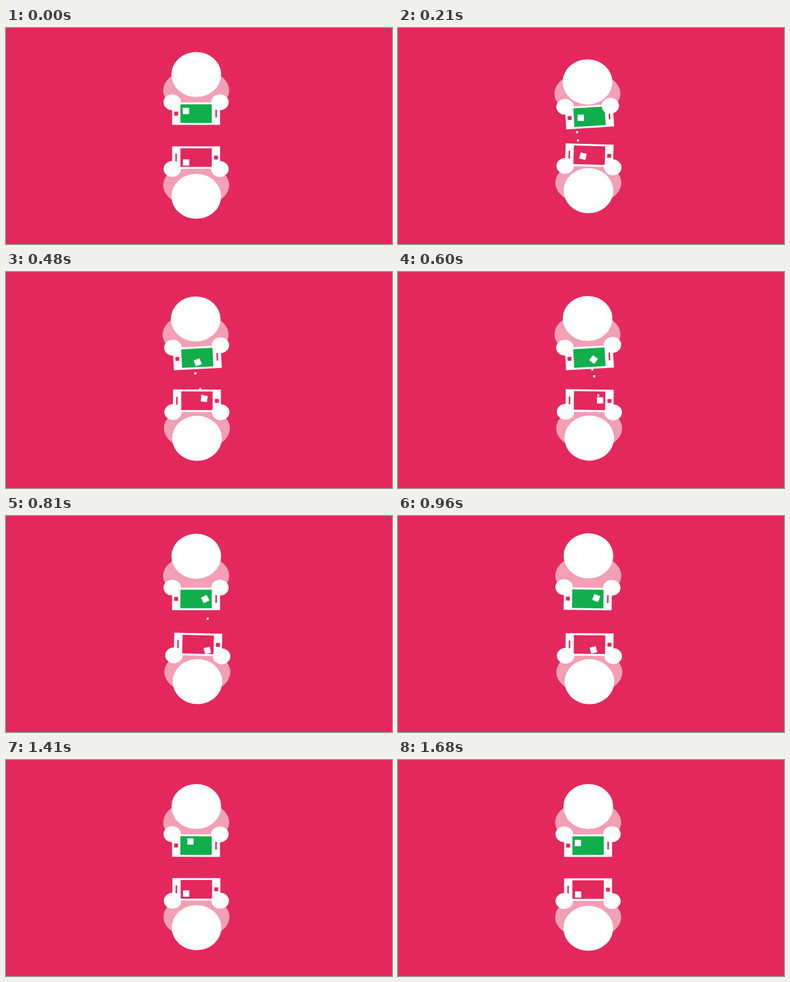
Animation, 640 px wide and 360 px high, one loop 1710 ms. Source, as an HTML page with a canvas:

```html
<!DOCTYPE html>
<html lang="en">
<head>
<meta charset="utf-8">
<title>Two players</title>
<style>
html, body { margin: 0; width: 100%; height: 100%; overflow: hidden; background: #e4285d; }
canvas { display: block; }
</style>
</head>
<body>
<canvas id="stage" width="640" height="360"></canvas>
<script>
const LOOP = 1710, STEP = 30, END = 1680;
const BG = '#e4285d', GREEN = '#10af4b', WHITE = '#fff', BODY = '#f39fb6';
const LAUNCHES = [30, 95, 325, 422, 463, 572, 645], SPARK_SPEED = 0.27;
const ctx = document.getElementById('stage').getContext('2d');

// All three run over the time from a to b
const part = (t, a, b) => Math.min(1, Math.max(0, (t - a) / (b - a)));
const hump = (t, a, b) => Math.sin(Math.PI * part(t, a, b)) ** 2;
const arc = (t, a, b) => 4 * part(t, a, b) * (1 - part(t, a, b));
const ease = (t, a, b) => part(t, a, b) ** 2 * (3 - 2 * part(t, a, b));

function topPose(t) {
  const press = hump(t, 0, 420);
  const tilt = 1.8 * hump(t, 800, 1480) - 3.6 * (press + hump(t, 300, 800));
  return {
    press, tilt,
    sway: 0.35 * tilt,
    bob: 13.5 * (hump(t, 0, 520) - hump(t, 640, 1140)),
    block: [
      314.3 - 16 * Math.cos(2 * Math.PI * part(t, 0, END)),
      138.3 + 13.7 * arc(t, 0, 720) - 2.9 * arc(t, 810, END)
    ],
    turn: -180 * ease(t, 300, 1140)
  };
}

function lowPose(t) {
  const drift = hump(t, 0, END);
  return {
    press: 0,
    tilt: 1.7 * hump(t, 0, 420) + 1.3 * hump(t, 400, 1100),
    sway: 2 * drift,
    bob: -9.5 * hump(t, 0, 520) - 4.5 * drift,
    block: [
      298.7 + 38 * hump(t, 0, 1380),
      224.2 - 13.7 * arc(t, 0, 800) - 1.8 * arc(t, 810, END)
    ],
    turn: 15 * Math.sin(2 * Math.PI * part(t, 0, 1200))
  };
}

function oval(x, y, rx, ry, color) {
  ctx.fillStyle = color;
  ctx.beginPath();
  ctx.ellipse(x, y, rx, ry, 0, 0, 7);
  ctx.fill();
}

function box(x, y, w, h, color) {
  ctx.fillStyle = color;
  ctx.fillRect(x - w / 2, y - h / 2, w, h);
}

function turned(x, y, deg, draw) {
  ctx.save();
  ctx.translate(x, y);
  ctx.rotate(deg * Math.PI / 180);
  draw();
  ctx.restore();
}

// dir is 1 for the player at the top and -1 for the one facing it
function player(pose, dir, headY, bodyY, phoneY, screen) {
  const { press, tilt, sway, bob, block, turn } = pose;
  const x = 315.5 + sway, lift = 0.42 * bob;
  const px = x - 0.3 - dir * tilt, py = phoneY + lift;

  oval(x - 0.2, bodyY + lift, 54.7, 36, BODY);
  turned(px, py, tilt + (dir < 0 ? 180 : 0), () => {
    box(0, 0, 79.5, 37.5, WHITE);
    box(0, 0, 52, 31, screen);
    box(-33, 0, 6.5, 6.5, BG);
    box(33.2, 0, 2.5, 13, BG);
  });
  turned(px, py, tilt, () => {
    oval(-39.5, -19 * dir, 14.5, 13.2, WHITE);
    oval(39.5 - 4 * press, (3 * press - 19) * dir, 14.5, 13.2, WHITE);
  });
  turned(...block, turn, () => box(0, 0, 10.5, 10.5, WHITE));
  oval(x, headY + bob, 41.2, 37.6, WHITE);
}

// Sparks leave the lower block and rise until the upper phone covers them
function sparks(t) {
  for (const launch of LAUNCHES) {
    const [x, from] = lowPose(launch).block;
    const y = from - SPARK_SPEED * (t - launch);
    if (t > launch && y > 150) box(x - 2, y, 3.5, 3.5, WHITE);
  }
}

function draw(t) {
  box(320, 180, 640, 360, BG);
  player(lowPose(t), -1, 280.5, 262, 216, BG);
  sparks(t);
  player(topPose(t), 1, 77.5, 104, 142.7, GREEN);
}

const start = performance.now();
function tick() {
  const t = (performance.now() - start) % LOOP;
  draw(Math.floor(t / STEP) * STEP);
  requestAnimationFrame(tick);
}
tick();
</script>
</body>
</html>
```
